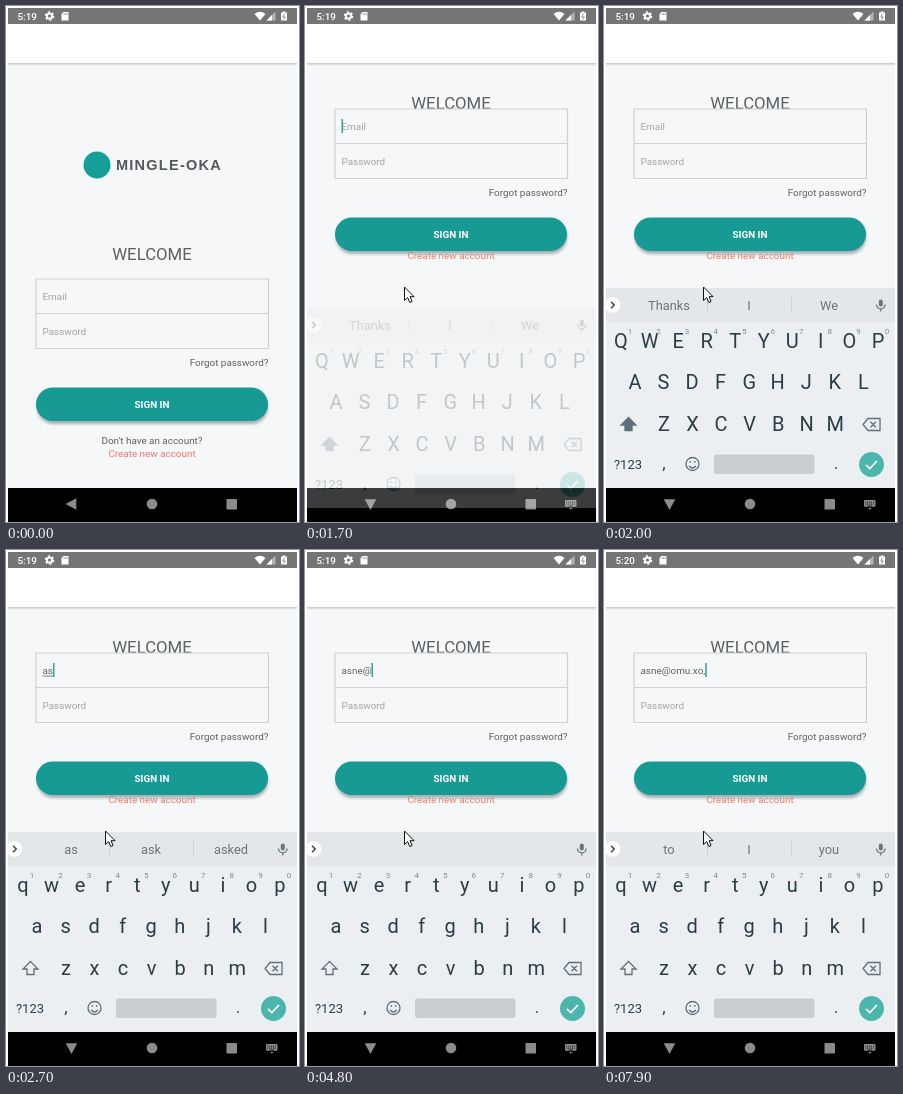
An HTML page that plays this animation: 293 by 516 pixels, repeating every 8000 ms.

```html
<!DOCTYPE html>
<html lang="en">
<head>
<meta charset="utf-8">
<title>Sign in</title>
<style>
  html, body { margin: 0; width: 100%; height: 100%; overflow: hidden; background: #fff; }
  svg { display: block; width: 293px; height: 516px; }
  text { font-family: Roboto, sans-serif; font-size: 9.9px; fill: #5d6163; white-space: pre; }
  .mid { text-anchor: middle; }
  .hint { fill: #a2a5a7; }
  .key { font-size: 20px; fill: #2b3d46; text-anchor: middle; }
  .digit { font-size: 8px; fill: #80888c; text-anchor: middle; }
  .word { font-size: 12.8px; fill: #6d7376; text-anchor: middle; }
  .line { fill: none; stroke: #5f7079; stroke-width: 1.3; }
</style>
</head>
<body>
<svg viewBox="0 0 293 516">
  <defs>
    <linearGradient id="drop" x2="0" y2="1">
      <stop stop-color="#c3c5c7"/><stop offset="1" stop-color="#f5f7f9"/>
    </linearGradient>
    <filter id="soft" x="-10%" y="-30%" width="120%" height="180%"><feGaussianBlur stdDeviation="1.6"/></filter>
    <clipPath id="screen"><rect x="2" y="2" width="289" height="514"/></clipPath>
  </defs>
  <rect width="293" height="516" fill="#fff"/>
  <g clip-path="url(#screen)">
    <rect x="2" y="2" width="289" height="514" fill="#f5f7f9"/>

    <g id="brand">
      <circle cx="91" cy="159" r="13.5" fill="#14a098"/>
      <text x="110" y="163.5" style="font:bold 14.5px 'Liberation Sans',Arial,sans-serif;letter-spacing:1.25px;fill:#55585b">MINGLE-OKA</text>
    </g>

    <g id="signup">
      <text class="mid" x="146" y="437.5">Don't have an account?</text>
      <text class="mid" x="146" y="451" style="fill:#f4756a">Create new account</text>
    </g>
    <text id="welcome" class="mid" x="146" y="254" style="font-size:16.8px">WELCOME</text>

    <g id="form">
      <path d="M30 273H262.5V342.5H30ZM30 307.5H262.5" fill="none" stroke="#cfd2d4" stroke-width="1.2"/>
      <text id="emailHint" class="hint" x="36.5" y="294">Email</text>
      <text class="hint" x="36.5" y="329">Password</text>
      <text id="email" x="36.5" y="294"></text>
      <rect id="underline" x="36.5" y="295.6" height=".9" fill="#777"/>
      <rect id="caret" width="1.5" height="14" fill="#3a9f93"/>
      <text x="262.5" y="360" text-anchor="end">Forgot password?</text>
      <rect x="31" y="385" width="231" height="33" rx="16.5" fill="#8d9799" opacity=".75" filter="url(#soft)"/>
      <rect x="30" y="381.5" width="232" height="33.5" rx="16.75" fill="#179a94"/>
      <text class="mid" x="146" y="402" style="font-weight:700;fill:#fff">SIGN IN</text>
    </g>

    <rect x="2" y="18" width="289" height="39" fill="#fff"/>
    <rect x="2" y="57" width="289" height="3" fill="url(#drop)"/>

    <g id="status" fill="#fff">
      <rect x="2" y="2" width="289" height="16" fill="#757575"/>
      <text id="clock" x="11.5" y="13.7" style="font-weight:500;fill:#fff"></text>
      <circle cx="43.5" cy="10" r="2.6" fill="none" stroke="#fff" stroke-width="2"/>
      <circle cx="43.5" cy="10" r="4" fill="none" stroke="#fff" stroke-width="1.6" stroke-dasharray="2.1 2.09"/>
      <path d="M57.5 6H62.5V14.5H55.5V8Z"/>
      <path d="M58 7.2V9M59.7 7.2V9M61.2 7.2V9" stroke="#757575" stroke-width=".7"/>
      <path d="M248.5 8Q254 3.500 259.500 8L254 14.500Z"/>
      <path d="M269.500 5.500V14.500H260.500Z" opacity=".45"/>
      <path d="M266 9V14.500H260.500Z"/>
      <path d="M275 6.500H276.700V5.500H279.300V6.500H281V14.500H275Z"/>
      <path d="M278.500 7.500L276.800 11H279.300L277.700 13.500" fill="none" stroke="#757575" stroke-width=".8"/>
    </g>

    <g id="nav" fill="#8b8b8b">
      <rect x="2" y="482" width="289" height="34" fill="#000"/>
      <path id="back" d="M-6 0L4.800-5.800V5.800Z"/>
      <circle cx="146" cy="498" r="5.300"/>
      <rect x="220.500" y="493" width="10.500" height="10.500" rx=".8"/>
      <g id="imeIcon">
        <rect x="260" y="494" width="11.500" height="6.800" rx="1"/>
        <path d="M261.300 496.200H270.500M261.300 498.100H270.500" stroke="#000" stroke-width=".9" stroke-dasharray="1 .9"/>
        <path d="M263.500 499.900H268" stroke="#000" stroke-width=".7"/>
        <path d="M264 502H267.600L265.800 503.800Z"/>
      </g>
    </g>

    <g id="keyboard">
      <rect x="2" y="282" width="289" height="200" fill="#eceff1"/>
      <rect x="2" y="282" width="289" height="34" fill="#e3e7e9"/>
      <circle cx="8.500" cy="299" r="7.800" fill="#fff"/>
      <path d="M7 295.800L10.200 299L7 302.200" fill="none" stroke="#444" stroke-width="1.500"/>
      <path id="dividers" d="M103.500 291V307M187.500 291V307" stroke="#cdd2d5"/>
      <g id="words"></g>
      <g fill="none" stroke="#6b767c" stroke-width="1.300">
        <rect x="274.800" y="293.500" width="4" height="7" rx="2" fill="#6b767c" stroke="none"/>
        <path d="M272.500 298.500A4.300 4.300 0 0 0 281.100 298.500M276.800 302.800V305.500"/>
      </g>
      <g id="keys"></g>
      <path id="shift" class="line" d="M24.500 411.500L32 419H28V424.500H21V419H17Z"/>
      <path class="line" d="M264 412.500H276V424.500H264L259 418.500ZM266.500 415.800L272 421.300M272 415.800L266.500 421.300"/>
      <text class="key" x="24" y="463" style="font-size:13px">?123</text>
      <text class="key" x="60" y="463" style="font-size:17px">,</text>
      <text class="key" x="232" y="463" style="font-size:17px">.</text>
      <circle class="line" cx="88.500" cy="458" r="6.500"/>
      <path class="line" d="M85.200 460Q88.500 464 91.800 460"/>
      <path d="M85.500 456H87M90 456H91.500" stroke="#5f7079" stroke-width="1.600"/>
      <rect x="110" y="448.500" width="100.500" height="19.500" rx="2.500" fill="#c9cdd0"/>
      <circle cx="267.500" cy="458.500" r="12.500" fill="#4db6ac"/>
      <path d="M262 458.800L265.800 462.500L273 455" fill="none" stroke="#fff" stroke-width="1.700"/>
    </g>

    <path id="mouse" d="M0 0V13.500L3.200 10.600L5.300 15.500L7.600 14.500L5.500 9.700H9.600Z" fill="#fff" stroke="#111" stroke-linejoin="round"/>
  </g>
</svg>
<script>
const LOOP = 8000, STEP = 100;
const $ = id => document.getElementById(id);

// Each table lists [start in ms, value].
const typed = [
  [0, ''], [2700, 'as'], [3100, 'asn'], [3300, 'asne'], [4800, 'asne@'],
  [5600, 'asne@o'], [5700, 'asne@om'], [5900, 'asne@omu'], [6000, 'asne@omu.'],
  [6300, 'asne@omu.x'], [6400, 'asne@omu.xo'], [6900, 'asne@omu.xo,']
];
const suggestions = [
  [0, 'Thanks I We'], [2700, 'as ask asked'], [3100, 'asn ask asset'],
  [3400, 'asne ask asset'], [4800, ''], [6000, 'thanks I we'], [6300, ''], [6900, 'to I you']
];
const caretField = [
  [0, ''], [300, 'password'], [800, ''], [1100, 'email'], [2000, ''], [2700, 'email'],
  [3900, ''], [4400, 'email'], [5300, ''], [5600, 'email'], [7400, ''], [7900, 'email']
];
const pointer = [
  [0, null], [600, [62, 459]], [700, [78, 382]], [800, [89, 312]],
  [900, [94, 279]], [1100, [97, 280]], [1200, [99.5, 281]]
];
const slide = [[0, [0, 0]], [1700, [20, .25]], [1800, [6, .85]], [1900, [1, .98]], [2000, [0, 1]]];

const at = (table, t) => table.findLast(row => row[0] <= t)[1];
const show = (id, on) => $(id).setAttribute('visibility', on ? 'visible' : 'hidden');
const move = (id, x, y, extra = '') => $(id).setAttribute('transform', `translate(${x} ${y}) ${extra}`);
const label = (cls, x, y, s) => `<text class="${cls}" x="${x}" y="${y}">${s}</text>`;

function setMarkup(id, markup) {
  const node = $(id);
  if (node.markup !== markup) node.innerHTML = node.markup = markup;
}

function keyMarkup(caps) {
  const rows = [['qwertyuiop', 17, 342], ['asdfghjkl', 31, 383], ['zxcvbnm', 60, 425]];
  const letters = rows.flatMap(([row, x, y]) => [...row].map((c, i) =>
    label('key', x + i * 28.55, y, caps ? c.toUpperCase() : c)));
  const digits = [...'1234567890'].map((d, i) => label('digit', 26 + i * 28.55, 327.5, d));
  return letters.concat(digits).join('');
}
const upperKeys = keyMarkup(true), lowerKeys = keyMarkup(false);

function render(t) {
  const raised = t >= 1700, caps = t < 2700;
  show('brand', !raised);
  move('welcome', 0, raised ? -151 : 0);
  move('form', 0, raised ? -170 : 0);
  move('signup', 0, raised ? -198 : 0);
  $('clock').textContent = t < 5100 ? '5:19' : '5:20';

  const text = at(typed, t), field = at(caretField, t);
  $('email').textContent = text;
  const width = text ? $('email').getComputedTextLength() : 0;
  show('emailHint', !text);
  show('underline', t >= 2700 && t < 4800);
  $('underline').setAttribute('width', width);
  show('caret', field);
  $('caret').setAttribute('x', 36.5 + (field === 'email' ? width : 0));
  $('caret').setAttribute('y', field === 'password' ? 318 : 283);

  const turn = Math.min(1, Math.max(0, (t - 1100) / 400));
  move('back', 65.5, 498, `rotate(${-90 * turn})`);
  $('imeIcon').setAttribute('opacity', turn);

  const [drop, alpha] = at(slide, t);
  show('keyboard', alpha > 0);
  move('keyboard', 0, drop);
  $('keyboard').setAttribute('opacity', alpha);
  $('shift').style.fill = caps ? '#5f7079' : 'none';
  setMarkup('keys', caps ? upperKeys : lowerKeys);
  const words = at(suggestions, t);
  $('dividers').style.display = words ? '' : 'none';
  setMarkup('words', words && words.split(' ').map((w, i) => label('word', 65 + i * 80, 304, w)).join(''));

  const tip = at(pointer, t);
  show('mouse', tip);
  if (tip) move('mouse', ...tip);
}

function tick() {
  const t = performance.now() % LOOP;
  render(Math.floor(t / STEP) * STEP);
  requestAnimationFrame(tick);
}
tick();
</script>
</body>
</html>
```
